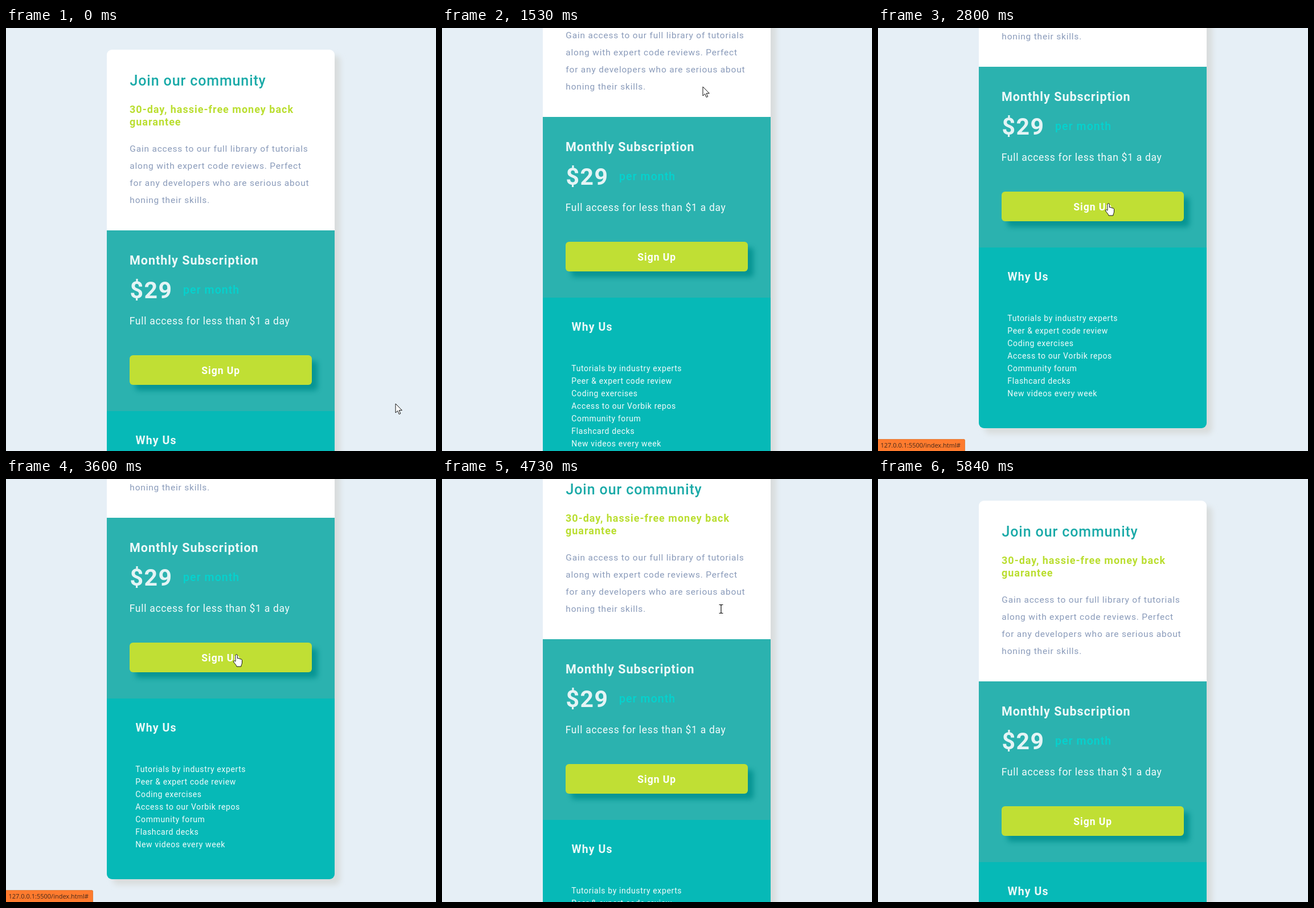
Animation of 755x742 px, one loop 5.91 s. Source, as an HTML page:

```html
<!DOCTYPE html>
<html lang="en">
<head>
<meta charset="utf-8">
<title>Pricing card</title>
<style>
  html, body { margin: 0; width: 100%; height: 100%; overflow: hidden; background: #e6eff6; }
  svg { display: block; }
  text { font-family: Roboto, "Liberation Sans", sans-serif; white-space: pre; }
  .title { font-size: 25px; font-weight: 500; letter-spacing: .88px; fill: #1aaaa8; }
  .offer { font-size: 18px; font-weight: 700; letter-spacing: 1px; fill: #bade30; }
  .body { font-size: 15.5px; letter-spacing: .8px; fill: #8a9bba; }
  .plan { font-size: 21.5px; font-weight: 700; letter-spacing: 1px; fill: #eef9f9; }
  .price { font-size: 41px; font-weight: 700; letter-spacing: 1.5px; fill: #e4f4f5; }
  .per { font-size: 19.5px; font-weight: 500; letter-spacing: 1.1px; fill: #04d3cf; }
  .note { font-size: 17.5px; letter-spacing: .7px; fill: #f2fbfb; }
  .button { font-size: 17.5px; font-weight: 700; letter-spacing: 1px; fill: #fff; }
  .why { font-size: 19.5px; font-weight: 700; letter-spacing: 1.1px; fill: #eef9f9; }
  .item { font-size: 14px; letter-spacing: .63px; fill: #f2fbfb; }
  .url { font: 11px "Open Sans", "Noto Sans", sans-serif; fill: #43281a; }
</style>
</head>
<body>
<svg width="755" height="742" viewBox="0 0 755 742">
  <defs>
    <clipPath id="round"><rect x="177" y="38" width="400" height="951" rx="9"/></clipPath>
    <filter id="soft" x="-20%" y="-20%" width="140%" height="140%"><feGaussianBlur stdDeviation="5"/></filter>
  </defs>
  <rect width="755" height="742" fill="#e6eff6"/>
  <g id="page">
    <rect x="187" y="48" width="400" height="951" rx="9" fill="#d9dddd" filter="url(#soft)"/>
    <g clip-path="url(#round)">
      <rect x="177" y="38" width="400" height="317" fill="#fff"/>
      <rect x="177" y="355" width="400" height="317" fill="#2bb2af"/>
      <rect x="177" y="672" width="400" height="317" fill="#06b9b7"/>
    </g>
    <rect x="227" y="584" width="320" height="52" rx="6" fill="#008f8e" opacity=".85" filter="url(#soft)"/>
    <rect x="217" y="574" width="320" height="52" rx="6" fill="#c0df34"/>
  </g>
  <g id="status">
    <path d="M0 721h150q3 0 3 3v18H0z" fill="#ff7b2e"/>
    <path d="M0 721.5h150q2.5 0 2.5 2.5v18" fill="none" stroke="#e0813f"/>
    <text class="url" x="4.5" y="736">127.0.0.1:5500/index.html#</text>
  </g>
  <g id="cursor" stroke="#111" stroke-linejoin="round">
    <path id="arrow" fill="#fff" d="M0 0V16L3.7 12.5L6.2 18.5L8.7 17.4L6.2 11.6H11.3Z"/>
    <path id="hand" fill="#fff" transform="translate(-7 -1)" d="M5 13V2.5a1.7 1.7 0 0 1 3.4 0V8c.3-1.2 3-1 3 .6c.5-.9 2.7-.6 2.7 .9c.5-.7 2.4-.4 2.4 1.2V15c0 3-1.7 4-1.7 7H7c0-2-3-4.5-5.3-8c-1-1.6.8-3 2.1-1.8Z"/>
    <path id="beam" fill="none" stroke-width="1.2" d="M-3.5-7.5H-1L0-6.500L1-7.5H3.5M0-6.5V6.5M-3.5 7.5H-1L0 6.5L1 7.5H3.5"/>
  </g>
</svg>
<script>
const LOOP = 5910;
const $ = id => document.getElementById(id);

function write(style, x, y, lines, leading = 0) {
  lines.split('\n').forEach((str, i) => {
    const el = document.createElementNS('http://www.w3.org/2000/svg', 'text');
    el.setAttribute('class', style);
    el.setAttribute('x', x);
    el.setAttribute('y', y + i * leading);
    el.textContent = str;
    $('page').append(el);
  });
}

write('title', 217.5, 101, 'Join our community');
write('offer', 217, 149, '30-day, hassie-free money back\nguarantee', 22);
write('body', 217.3, 216.5, `Gain access to our full library of tutorials
along with expert code reviews. Perfect
for any developers who are serious about
honing their skills.`, 30);
write('plan', 217, 415, 'Monthly Subscription');
write('price', 217.5, 474, '$29');
write('per', 311, 466, 'per month');
write('note', 216.7, 520, 'Full access for less than $1 a day');
write('button', 343.3, 606.5, 'Sign Up');
write('why', 227.5, 730, 'Why Us');
write('item', 227.3, 801, `Tutorials by industry experts
Peer & expert code review
Coding exercises
Access to our Vorbik repos
Community forum
Flashcard decks
New videos every week`, 22);

const smooth = u => u * u * (3 - 2 * u);
const speedUp = u => u * u;
const slowDown = u => 1 - (1 - u) * (1 - u);

// Each move: start, end, easing, where it arrives
const scrolls = [
  [918, 1530, smooth, [199]],
  [1560, 2110, smooth, [287]],
  [4230, 4812, speedUp, [0]]
];
const moves = [
  [370, 580, smooth, [458, 103]],
  [2120, 2730, slowDown, [405, 308]],
  [3600, 4190, smooth, [490, 228]],
  [5050, 5590, smooth, [727, 708]]
];

function follow(from, track, t) {
  let place = from;
  for (const [start, end, ease, to] of track) {
    if (t <= start) break;
    const k = ease(Math.min(1, (t - start) / (end - start)));
    place = place.map((v, i) => v + (to[i] - v) * k);
  }
  return place.map(Math.round);
}

function draw(t) {
  const [scroll] = follow([0], scrolls, t);
  const [x, y] = follow([684, 659], moves, t);
  const onButton = x > 217 && x < 537 && y + scroll > 574 && y + scroll < 626;
  const onText = t > 4050 && t < 5050;
  const kind = t >= 5840 ? 'none' : onButton ? 'hand' : onText ? 'beam' : 'arrow';

  $('page').setAttribute('transform', `translate(0 ${-scroll})`);
  $('cursor').setAttribute('transform', `translate(${x} ${y})`);
  for (const id of ['arrow', 'hand', 'beam']) $(id).style.display = id === kind ? '' : 'none';
  $('status').style.display = onButton && t >= 2800 && t < 4200 ? '' : 'none';
}

const began = performance.now();
function tick() {
  draw((performance.now() - began) % LOOP);
  requestAnimationFrame(tick);
}
tick();
</script>
</body>
</html>
```
